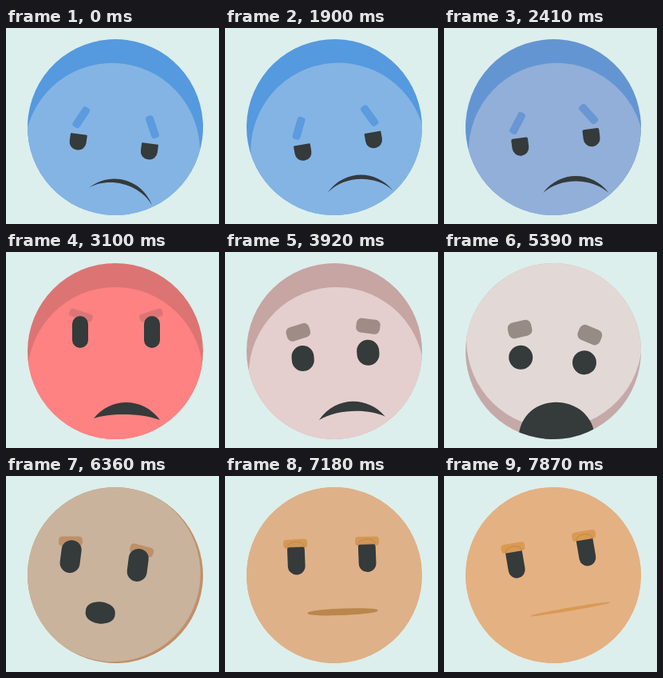
Animation, 267 px wide and 245 px high, one loop 7990 ms. Source, as an HTML page with a canvas:

```html
<!DOCTYPE html>
<html lang="en">
<head>
<meta charset="utf-8">
<title>Moody face</title>
<style>
html, body { margin: 0; width: 100%; height: 100%; overflow: hidden; background: #dcefec; }
canvas { display: block; width: 267px; height: 245px; }
</style>
</head>
<body>
<canvas id="stage"></canvas>
<script>
const LOOP = 7990, R = 110, DARK = '#353a3b';
const canvas = document.getElementById('stage');
const ctx = canvas.getContext('2d');
const dpr = window.devicePixelRatio || 1;
canvas.width = 267 * dpr;
canvas.height = 245 * dpr;

// eye: centre x, y, half gap, width, height, top radius
// brow: x, y from the eye, width, height, tilt
// mouth: x, y, tilt, half width, handle, upper bulge, lower bulge
// light: offset of the bright disc
// tint: face, shade, brow, mouth
const sad = {
  eye: [1, 24.5, 45, 21, 20, 1], brow: [0, -31, 29, 10, -64],
  mouth: [18, 85, 8, 41, 20, 28, -21], light: [0, 30], lid: [0],
  tint: ['#84b4e4', '#5599df', '#5b9bde', DARK]
};
const angry = {
  eye: [1, -24, 45, 20, 40, 10], brow: [1, -21, 30, 10, 18],
  mouth: [14.5, 85, 1.4, 41.5, 20, 28, -8], light: [0, 30], lid: [0],
  tint: ['#ff8282', '#dd7474', '#dc7676', DARK]
};
const uneasy = {
  eye: [1, 5.5, 41, 28, 32, 14], brow: [-3, -33, 30, 18, -12.5],
  mouth: [15, 85.5, 2, 41.5, 20, 28, -12], light: [0, 30], lid: [0],
  tint: ['#e4cfce', '#c6a5a3', '#a08c87', DARK]
};
const scared = {
  eye: [0, 11, 40, 30, 30, 15], brow: [-4, -35, 30, 20, -18],
  mouth: [13, 111, 0, 48, 48, 64, 64], light: [0, -14], lid: [0],
  tint: ['#e2d9d7', '#c5a9a9', '#968c85', DARK]
};
const stunned = {
  eye: [-16, -16, 42.4, 25, 41, 12], brow: [-2.5, -19, 30, 12, -7],
  mouth: [-12.6, 49, 0, 18.5, 20, 18, 18], light: [-3.5, -1.5], lid: [0],
  tint: ['#c9b39d', '#c0906a', '#be9068', DARK]
};
const bored = {
  eye: [1, -21, 45, 21, 34, 2], brow: [0, -21.5, 30, 11, 0],
  mouth: [14, 45.5, 0, 50, 56, 2.7, 2.7], light: [0, 0], lid: [1],
  tint: ['#e4b183', '#e4b183', '#d99a52', '#d99a52']
};

const moods = [
  [0, sad], [2150, sad], [2830, angry], [3200, angry], [3890, uneasy],
  [4800, scared], [5300, scared], [6357, stunned], [7500, bored], [LOOP, bored]
];
const tilts = [
  [0, 7.6], [1881, -10], [3086, 0], [3880, -5], [4828, 4], [6357, 7.3], [7870, -9.7], [LOOP, -9.7]
];
const beats = [120, 1200, 2290, 3350, 4400, 5540, 6630, 7720, 8920];

const lerp = (a, b, p) => a + (b - a) * p;
const rad = deg => deg * Math.PI / 180;
const hex = s => [1, 3, 5].map(i => parseInt(s.slice(i, i + 2), 16));

function mix(a, b, p) {
  if (typeof a === 'number') return lerp(a, b, p);
  const to = hex(b);
  return 'rgb(' + hex(a).map((v, i) => Math.round(lerp(v, to[i], p))) + ')';
}

function span(track, t) {
  let i = 0;
  while (i < track.length - 2 && t >= track[i + 1][0]) i++;
  const [t0, a] = track[i], [t1, b] = track[i + 1];
  const p = Math.min(1, Math.max(0, (t - t0) / (t1 - t0)));
  return [a, b, p * p * (3 - 2 * p)];
}

// Eight held steps between neighbouring beats
function snap(t) {
  if (t < beats[0]) return 0;
  let i = 0;
  while (t >= beats[i + 1]) i++;
  const step = (beats[i + 1] - beats[i]) / 8;
  return beats[i] + Math.floor((t - beats[i]) / step) * step;
}

function disc(x, y, color) {
  ctx.beginPath();
  ctx.arc(x, y, R, 0, Math.PI * 2);
  ctx.fillStyle = color;
  ctx.fill();
}

function box(w, h, top, bottom, color) {
  ctx.beginPath();
  ctx.roundRect(-w / 2, -h / 2, w, h, [top, top, bottom, bottom]);
  ctx.fillStyle = color;
  ctx.fill();
}

function drawEye(side, f) {
  const [cx, cy, gap, w, h, top] = f.eye;
  const [bx, by, bw, bh, tilt] = f.brow;
  ctx.save();
  ctx.translate(cx, cy);
  ctx.scale(side, 1);
  ctx.translate(-gap, 0);
  ctx.save();
  ctx.translate(bx, by);
  ctx.rotate(rad(tilt));
  box(bw, bh, bh * 0.36, bh * 0.36, f.tint[2]);
  ctx.restore();
  box(w, h, top, Math.min(w, h) / 2, DARK);
  if (f.lid[0] > 0.01) {
    ctx.globalAlpha = f.lid[0];
    ctx.beginPath();
    ctx.ellipse(0, 1 - h / 2, w / 2, 7, 0, Math.PI, Math.PI * 2);
    ctx.fillStyle = f.tint[2];
    ctx.fill();
    ctx.strokeStyle = 'rgba(130,85,40,.45)';
    ctx.lineWidth = 0.6;
    ctx.stroke();
  }
  ctx.restore();
}

function drawMouth(f) {
  const [x, y, tilt, w, a, up, low] = f.mouth;
  ctx.save();
  ctx.translate(x, y);
  ctx.rotate(rad(tilt));
  ctx.beginPath();
  ctx.moveTo(-w, 0);
  ctx.bezierCurveTo(-a, -up, a, -up, w, 0);
  ctx.bezierCurveTo(a, low, -a, low, -w, 0);
  ctx.fillStyle = f.tint[3];
  ctx.fill();
  ctx.restore();
}

function draw(t) {
  const [from, to, p] = span(moods, t);
  const f = {};
  for (const key in from) f[key] = from[key].map((v, i) => mix(v, to[key][i], p));
  ctx.setTransform(dpr, 0, 0, dpr, 0, 0);
  ctx.fillStyle = '#dcefec';
  ctx.fillRect(0, 0, 267, 245);
  ctx.save();
  ctx.translate(137, 124);
  ctx.rotate(rad(lerp(...span(tilts, t))));
  disc(0, 0, f.tint[1]);
  ctx.clip();
  disc(f.light[0], f.light[1], f.tint[0]);
  drawEye(1, f);
  drawEye(-1, f);
  drawMouth(f);
  ctx.restore();
}

const start = performance.now();
function tick() {
  draw(snap((performance.now() - start) % LOOP));
  requestAnimationFrame(tick);
}
tick();
</script>
</body>
</html>
```
